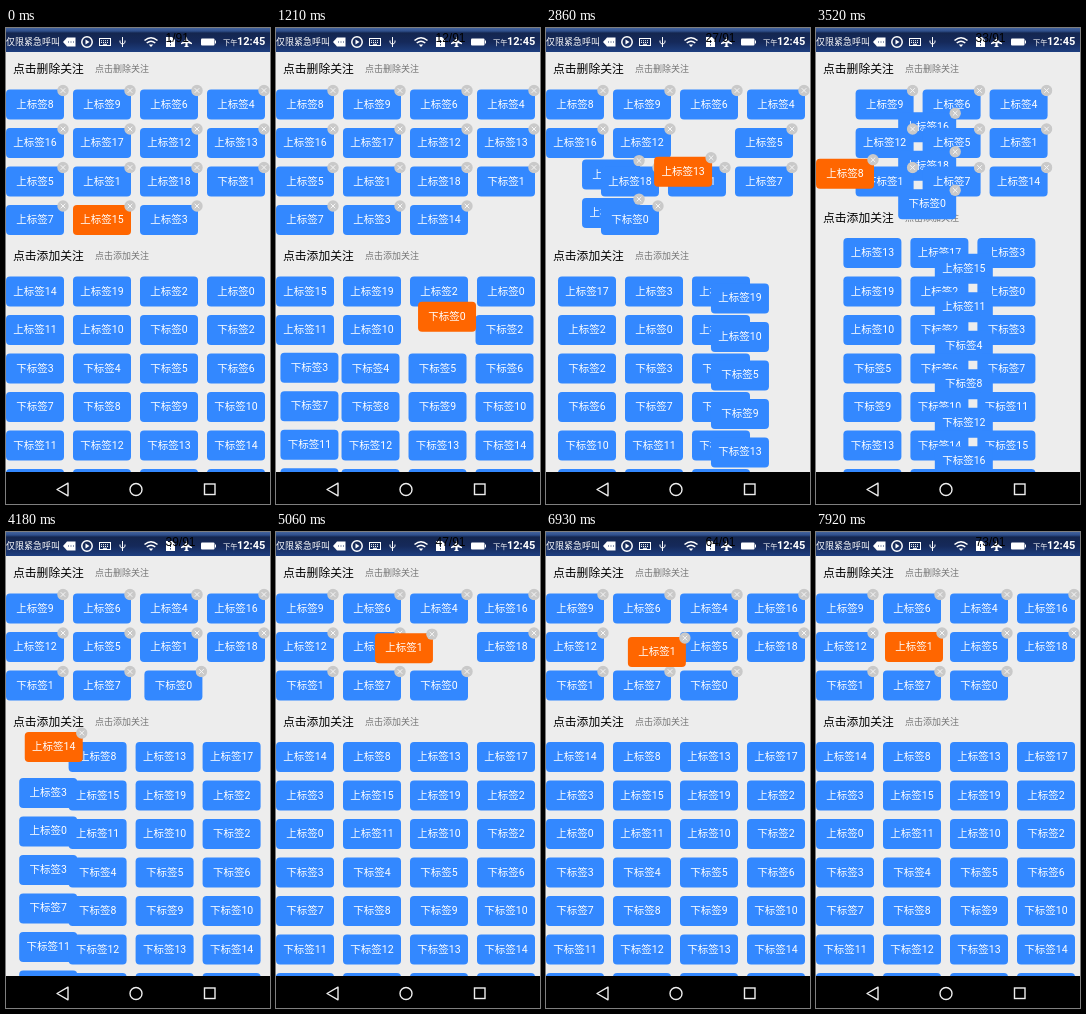
Animation of 264x476 px, one loop 8 s. Source, as an HTML page:

```html
<!DOCTYPE html>
<html lang="zh-CN">
<head>
<meta charset="utf-8">
<title>标签</title>
<style>
html, body { margin: 0; width: 100%; height: 100%; overflow: hidden; background: #000; }
#stage {
  position: absolute; left: 0; top: 0; width: 264px; height: 476px; overflow: hidden;
  background: #ededed; color: #000;
  font-family: Roboto, "Noto Sans CJK SC", "Noto Sans CJK", sans-serif;
}
#stage * { white-space: nowrap; }
#page { position: absolute; left: 0; top: 0; width: 264px; height: 444px; overflow: hidden; z-index: 0; }
.head { position: absolute; left: 0; top: 0; height: 20px; }
.head b { position: absolute; left: 7px; font: 500 11.8px/20px Roboto, "Noto Sans CJK SC", "Noto Sans CJK", sans-serif; }
.head span { position: absolute; left: 89px; font-size: 9px; line-height: 20px; color: #747474; }
.tag {
  position: absolute; left: 0; top: 0; width: 58px; height: 29.5px; border-radius: 4px;
  background: #3388ff; color: #fff; font-size: 10.5px; line-height: 29.5px; text-align: center;
}
.tag.hot { background: #ff6600; }
.tag svg { position: absolute; left: 51px; top: -5px; display: none; }
.tag.top svg { display: block; }
#bar {
  position: absolute; left: 0; top: 0; width: 264px; height: 24px; color: #fff; z-index: 1;
  background: linear-gradient(#43639c 0, #2f4f8c 3px, #14264f 5px, #15295a 14px, #1e3f80 24px);
}
#bar span { position: absolute; }
#carrier { left: 0; top: 7px; font-size: 9px; line-height: 14px; }
#half { left: 217px; top: 7px; font-size: 7.3px; line-height: 15px; }
#clock { left: 231px; top: 6px; font-size: 11px; line-height: 16px; font-weight: 700; }
#count { left: 159.5px; top: 3px; color: #000; font: 12px/14px "Liberation Sans", Arial, sans-serif; }
#bar svg, #nav svg { position: absolute; left: 0; top: 0; }
#nav { position: absolute; left: 0; top: 444px; width: 264px; height: 32px; background: #000; z-index: 1; }
</style>
</head>
<body>
<div id="stage">
  <div id="page">
    <div class="head" style="transform:translateY(31px)"><b>点击删除关注</b><span>点击删除关注</span></div>
    <div class="head" id="low"><b>点击添加关注</b><span>点击添加关注</span></div>
  </div>
  <div id="bar">
    <span id="carrier">仅限紧急呼叫</span>
    <svg width="264" height="24" fill="none" stroke="#fff">
      <path d="M57 14l4-4.500h8.500v9h-8.500z" fill="#fff" stroke="none"/>
      <path d="M62 14h1m1.500 0h1m1.500 0h1" stroke="#1a3366"/>
      <circle cx="81" cy="14" r="5.200" stroke-width="1.500"/>
      <path d="M79.500 11.500l4 2.500-4 2.500z" fill="#fff" stroke="none"/>
      <rect x="93.500" y="10.500" width="11" height="7"/>
      <path d="M95 12.700h8M95 14.500h8" stroke-dasharray="1 1"/>
      <path d="M97 16.300h4"/>
      <path d="M116.500 9v10M114 12.500v2l2.500 2 2.500-2v-2"/>
      <path d="M138.500 12.500q6.500-5.500 13 0M140.700 15q4.300-3.500 8.600 0" stroke-width="1.500"/>
      <path d="M142.700 16.500h4.600l-2.300 2.500z" fill="#fff" stroke="none"/>
      <path d="M160 9h6l3 3v7h-9z" fill="#fff" stroke="none"/>
      <path d="M164.500 12v3m0 1.200v1.300" stroke="#1a3366"/>
      <path d="M180.500 8.500l1.200 3.500 4.300 3v1.200l-4.300-1.200-.2 2.500 1.500 1.500h-5l1.500-1.500-.2-2.500-4.300 1.200v-1.200l4.300-3z" fill="#fff" stroke="none"/>
      <rect x="195" y="10.500" width="13.500" height="7" rx="1" fill="#fff" stroke="none"/>
      <path d="M209.500 12.500v3"/>
    </svg>
    <span id="half">下午</span><span id="clock">12:45</span>
    <span id="count"></span>
  </div>
  <div id="nav">
    <svg width="264" height="32" fill="none" stroke="#eee" stroke-width="1.400">
      <path d="M51 17.500l11-6.300v12.600z" stroke-linejoin="round"/>
      <circle cx="130" cy="17.500" r="6"/>
      <rect x="198.500" y="12" width="10.500" height="10.500"/>
    </svg>
  </div>
</div>
<script>
const LOOP = 8000, STEP = 110, MOVE = 300, PRESS = 220, ROW = 38.5, COL = 67, TOP = 61.5;
const up = n => '上标签' + n, down = n => '下标签' + n;
const DRAGGED = up(1), GRAB = 4730;

// When each tag changes place; lag delays the neighbours against it.
const events = [
  { at: 200, name: up(15) },
  { at: 640, name: up(14) },
  { at: 1174, name: down(0) },
  { at: 1745, name: up(3) },
  { at: 2350, name: up(17) },
  { at: 2802, name: up(13), lag: -0.085 },
  { at: 3380, name: up(8) },
  { at: 3922, name: up(14) },
  { at: 5130, name: DRAGGED, before: up(5) }
];
// time, x, y of the finger-held tag
const path = [
  [4800, 134, 100], [5280, 72, 102], [5500, 76, 108],
  [5940, 141, 124], [6300, 146, 127], [7150, 70, 101], [7920, 69, 100]
];

const start = {
  top: [...[8, 9, 6, 4, 16, 17, 12, 13, 5, 1, 18].map(up), down(1), ...[7, 15, 3].map(up)],
  low: [...[14, 19, 2, 0, 11, 10].map(up), down(0),
        ...Array.from({ length: 18 }, (_, i) => down(i + 2))]
};

function apply(state, e) {
  const top = state.top.filter(n => n !== e.name), low = state.low.filter(n => n !== e.name);
  if (e.before) top.splice(top.indexOf(e.before), 0, e.name);
  else if (state.top.includes(e.name)) low.unshift(e.name);
  else top.push(e.name);
  return { top, low };
}
const states = [start];
events.forEach(e => states.push(apply(states[states.length - 1], e)));

const clamp = v => Math.min(1, Math.max(0, v));
const ease = v => (1 - Math.cos(Math.PI * clamp(v))) / 2;
const mix = (a, b, k) => a.map((v, i) => v + (b[i] - v) * k);
const lowBase = s => TOP + Math.ceil(s.top.length / 4) * ROW + 33;
const slot = (i, base) => [i % 4 * COL, base + Math.floor(i / 4) * ROW];

function layout(state, base) {
  const pos = {};
  state.top.forEach((n, i) => pos[n] = slot(i, TOP));
  state.low.forEach((n, i) => pos[n] = slot(i, base));
  return pos;
}

function finger(t) {
  const i = path.findIndex(k => k[0] > t);
  if (i === 0) return path[0].slice(1);
  if (i < 0) return path[path.length - 1].slice(1);
  const a = path[i - 1], b = path[i];
  return mix(a.slice(1), b.slice(1), ease((t - a[0]) / (b[0] - a[0])));
}

const page = document.getElementById('page');
const lowHead = document.getElementById('low');
const count = document.getElementById('count');
const cross = '<svg width="12" height="12"><circle cx="6" cy="6" r="5.700" fill="#c9c9c9"/>' +
  '<path d="M3.700 3.700l4.600 4.600m0-4.600l-4.600 4.600" stroke="#f6f6f6"/></svg>';
const tags = {};
[...start.top, ...start.low].forEach(n => {
  const el = tags[n] = document.createElement('div');
  el.innerHTML = n + cross;
  page.appendChild(el);
});

function render(t) {
  let i = events.length - 1;
  while (i >= 0 && events[i].at > t) i--;
  const e = events[i], next = events[i + 1];
  const from = states[Math.max(i, 0)], to = states[i + 1];
  const p = e ? (t - e.at) / MOVE : 2;
  const moving = p < 1, base = lowBase(to);
  const a = layout(from, base), b = layout(to, base);
  const k = e ? ease(p - (e.lag ?? 0.025)) : 1;
  const held = t >= GRAB;

  [...to.top, ...to.low].forEach((n, order) => {
    const active = moving && n === e.name;
    const hot = active || (held && n === DRAGGED) ||
      (next && n === next.name && !next.before && t >= next.at - PRESS);
    let xy = mix(a[n], b[n], k);
    if (active) xy = mix(layout(from, lowBase(from))[n], b[n], clamp(p));
    if (held && n === DRAGGED) xy = finger(t);
    const inTop = (active ? from : to).top.includes(n);
    const el = tags[n];
    el.className = 'tag' + (hot ? ' hot' : '') + (inTop ? ' top' : '');
    el.style.zIndex = hot ? 99 : order + 1;
    el.style.transform = `translate(${xy[0]}px,${xy[1]}px)`;
  });
  lowHead.style.transform = `translateY(${base - 30.5}px)`;
  count.textContent = Math.round(t / STEP) + 1 + '/91';
}

function tick() {
  const t = performance.now() % LOOP;
  render(Math.floor(t / STEP) * STEP);
  requestAnimationFrame(tick);
}
tick();
</script>
</body>
</html>
```
